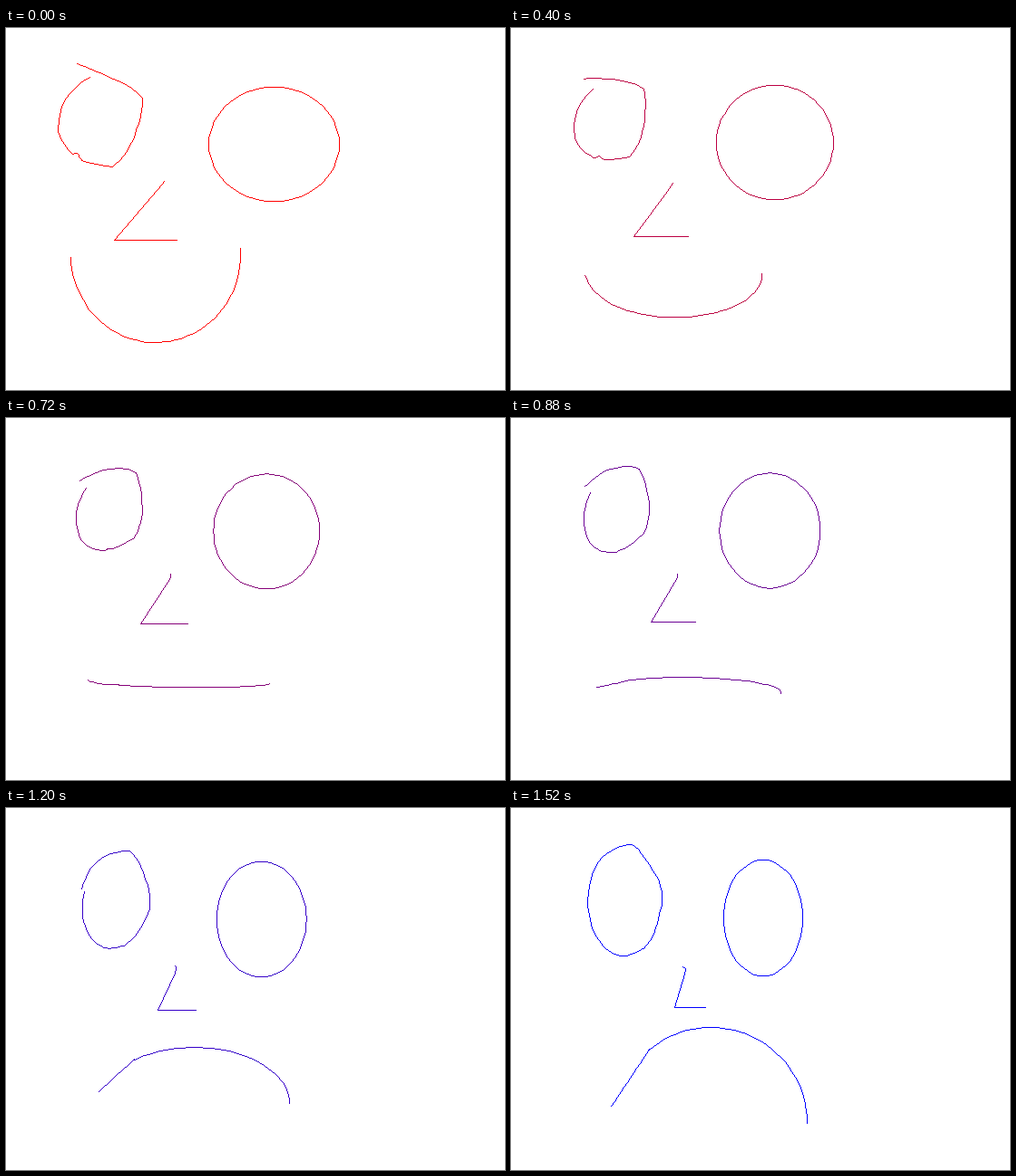
Recreate the animation shown at these times as an HTML page with a canvas. Size 550 px wide and 400 px high, loop 1600 ms.

```html
<!DOCTYPE html>
<html lang="en">
<head>
<meta charset="utf-8">
<title>Face morph</title>
<style>
  html, body { margin: 0; height: 100%; overflow: hidden; background: #fff; }
  canvas { display: block; }
</style>
</head>
<body>
<canvas id="stage" width="550" height="400"></canvas>
<script>
const FRAME_MS = 80, FRAMES = 20;
const ctx = document.getElementById('stage').getContext('2d');

const mix = (a, b, t) => a + (b - a) * t;
const mixPoint = (p, q, t) => [mix(p[0], q[0], t), mix(p[1], q[1], t)];
const sample = (n, fn) => Array.from({ length: n + 1 }, (_, i) => fn(i / n));

// Shapes are functions of a parameter: degrees for ellipses, 0..1 for lines.
const ellipse = (cx, cy, rx, ry) => deg => {
  const a = deg * Math.PI / 180;
  return [cx + rx * Math.cos(a), cy + ry * Math.sin(a)];
};
const line = (p, q) => s => mixPoint(p, q, s);

// Catmull-Rom curve; the end tangents continue the curvature.
function spline(points) {
  const extend = (a, b, c) => [0, 1].map(k => 3 * a[k] - 3 * b[k] + c[k]);
  const rev = [...points].reverse();
  const p = [extend(...points), ...points, extend(...rev)];
  return points.slice(1).flatMap((_, i) => sample(6, s => [0, 1].map(k => {
    const [a, b, c, d] = p.slice(i, i + 4).map(v => v[k]);
    return b + s / 2 * (c - a + s * (2 * a - 5 * b + 4 * c - d + s * (3 * (b - c) + d - a)));
  })));
}

// One-pixel line without antialiasing.
function plot(points) {
  const px = points.map(p => p.map(Math.round));
  px.slice(1).forEach((end, i) => {
    const start = px[i];
    const n = Math.max(Math.abs(end[0] - start[0]), Math.abs(end[1] - start[1]), 1);
    for (let k = 0; k <= n; k++) {
      const [x, y] = mixPoint(start, end, k / n).map(Math.round);
      ctx.fillRect(x, y, 1, 1);
    }
  });
}

const rightWide = ellipse(295, 128, 72, 63), rightTall = ellipse(277.5, 121, 43.5, 64);
const leftTall = ellipse(124.5, 102, 40.5, 61);
const smile = ellipse(164.5, 250, 93.5, 97), frown = ellipse(220, 348, 106, 106);
const cheek = line([110, 329], [152, 266]);

// Hand-drawn eye: x, y and the angle each point reaches on the tall ellipse.
const eyeTop = [[78, 39, 180], [118, 55.5, 225], [143, 70, 270],
  [150, 85, 292], [138, 126, 340], [117, 153, 367.6]];
const eyeBottom = [[117, 153, 367.6], [86, 147, 397.3], [78, 138, 413.5],
  [72, 138, 421], [60, 122, 451], [57.5, 105, 480], [66, 77, 510], [92, 54, 540]];

// Nose corners: start x, y and end x, y.
const nose = [[174, 169, 189, 175], [171, 172.5, 191.5, 177], [165.5, 179, 191, 183],
  [119, 233.6, 180, 219.6], [188, 233.6, 214, 219.6]];

function draw(t) {
  ctx.clearRect(0, 0, 550, 400);
  ctx.fillStyle = `rgb(${Math.round(mix(255, 0, t))},0,${Math.round(mix(0, 255, t))})`;

  for (const keys of [eyeTop, eyeBottom])
    plot(spline(keys.map(([x, y, deg]) => mixPoint([x, y], leftTall(deg), t))));
  plot(sample(60, s => mixPoint(rightWide(s * 360), rightTall(s * 360), t)));
  plot(nose.map(([x, y, u, v]) => mixPoint([x, y], [u, v], t)));
  plot(sample(12, s => mixPoint(smile(mix(178, 134, s)), cheek(s), t)));
  plot(sample(36, s => mixPoint(smile(mix(134, -4, s)), frown(mix(230, 360, s)), t)));
}

function tick() {
  const step = Math.floor(performance.now() / FRAME_MS) % FRAMES;
  draw(step / (FRAMES - 1));
  requestAnimationFrame(tick);
}
tick();
</script>
</body>
</html>
```
